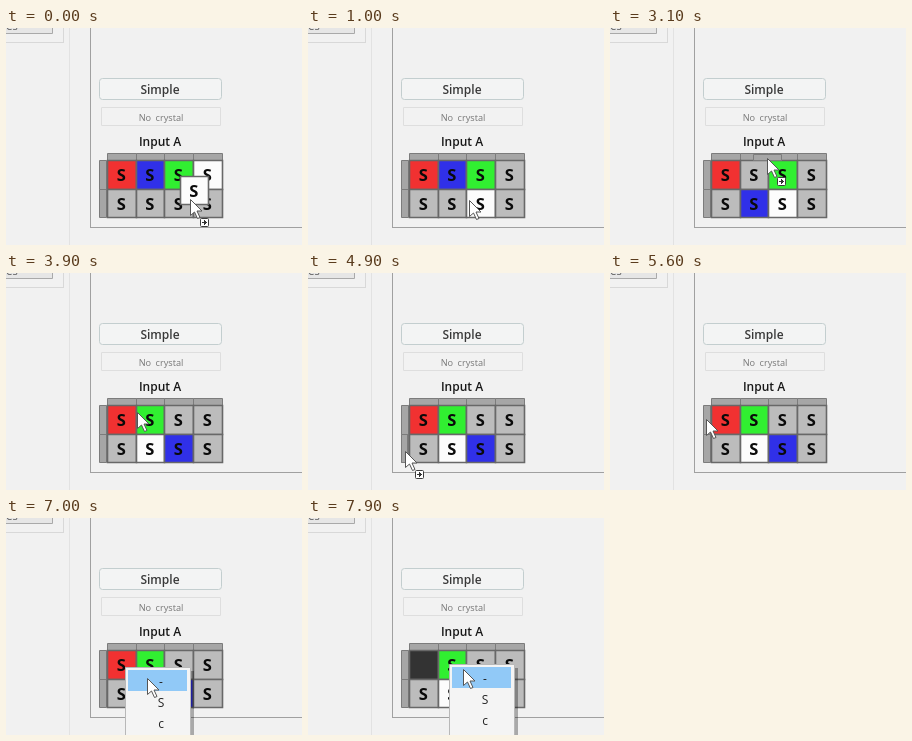
Recreate the animation shown at these times as an HTML page with a canvas. Size 296 px wide and 217 px high, loop 8000 ms.

```html
<!DOCTYPE html>
<html>
<head>
<meta charset="utf-8">
<style>
html, body { margin: 0; height: 100%; overflow: hidden; background: #f1f1f1; }
canvas { display: block; }
</style>
</head>
<body>
<canvas id="stage" width="296" height="217"></canvas>
<script>
const ctx = document.getElementById('stage').getContext('2d');
const LOOP = 8000, STEP = 100;
const GRAY = '#bcbcbc', RED = '#f13131', BLUE = '#3030e8', GREEN = '#31ef31', WHITE = '#fcfcfc', DARK = '#333';
const HEAD = '#a6a6a6';

// Grid geometry: each area is [x, y, width, height]
const colX = c => Math.floor(101.4 + 28.7 * c);
const rowY = r => Math.floor(132.5 + 28.6 * r);
const colHead = c => [colX(c), 125, colX(c + 1) - colX(c), 7];
const rowHead = r => [93, rowY(r), 7, rowY(r + 1) - rowY(r)];
const cellArea = i => {
  const [x, , w] = colHead(i % 4), [, y, , h] = rowHead(i >> 2);
  return [x, y, w, h];
};

// Pointer moves: start, end, destination; it rests in between
const moves = [
  [-200, 0, 184, 171], [0, 300, 172, 182],
  [800, 1200, 149, 161], [1400, 1700, 145, 187],
  [2200, 2700, 172, 129], [3000, 3200, 142, 130],
  [3500, 3900, 131, 139], [3900, 4600, 97, 149],
  [4700, 4900, 97, 178], [5200, 5500, 96, 146],
  [6100, 6500, 119, 149], [6600, 7000, 141, 160],
  [7500, 7700, 141, 146], [7700, 7900, 155, 151]
];

const swapRows = [0, 1, 2, 3].map(i => [i, i + 4]);
const drags = [
  { from: -200, to: 600, cell: 3, area: cellArea(3), swaps: [[3, 6]] },
  { from: 1400, to: 2200, cell: 1, area: cellArea(1), swaps: [[1, 5]] },
  { from: 3000, to: 3500, area: colHead(2), swaps: [[1, 2], [5, 6]] },
  { from: 4700, to: 5000, area: rowHead(0), swaps: swapRows },
  { from: 5200, to: 5500, area: rowHead(1), swaps: swapRows }
];
const menus = [{ from: 6600, to: 7500 }, { from: 7700, to: LOOP }];
const activeAt = (list, t) => list.find(item => t >= item.from && t < item.to);

function pointerAt(t) {
  let x = 197, y = 155;
  for (const [from, to, endX, endY] of moves) {
    const k = Math.max(0, Math.min(1, (t - from) / (to - from)));
    x += (endX - x) * k;
    y += (endY - y) * k;
  }
  return [Math.round(x), Math.round(y)];
}

function cellsAt(t) {
  const cells = [RED, BLUE, GREEN, WHITE, GRAY, GRAY, GRAY, GRAY];
  for (const { to, swaps } of drags) {
    if (t >= to) swaps.forEach(([a, b]) => [cells[a], cells[b]] = [cells[b], cells[a]]);
  }
  if (t >= menus[0].to) cells[0] = DARK;
  return cells;
}

function rect(x, y, w, h, fill) {
  ctx.fillStyle = fill;
  ctx.fillRect(x, y, w, h);
}

function box([x, y, w, h], fill, stroke, radius = 0, line = 1) {
  ctx.beginPath();
  ctx.roundRect(x + .5, y + .5, w, h, radius);
  ctx.fillStyle = fill;
  ctx.fill();
  ctx.strokeStyle = stroke;
  ctx.lineWidth = line;
  ctx.stroke();
}

function text(str, x, y, size, weight, color) {
  ctx.font = `${weight} ${size}px "Open Sans", "Noto Sans", sans-serif`;
  ctx.textAlign = 'center';
  ctx.fillStyle = color;
  ctx.fillText(str, x, y);
}

function drawCell(area, fill) {
  const [x, y, w, h] = area;
  box(area, fill, '#686868', 0, 1.6);
  if (fill !== DARK) text('S', x + w / 2 - .2, y + h / 2 + 6.7, 16.5, 700, '#0a0a0a');
}

const drawHead = area => box(area, HEAD, '#7c7c7c');

function drawWindow() {
  rect(0, 0, 296, 217, '#f1f1f1');
  box([-5, -20, 51, 25], '#e6e6e6', '#a9a9a9');
  text('es', 6, 2, 11, 400, '#555');
  rect(0, 14, 58, 1, '#d8d8d8');
  rect(57, 0, 1, 14, '#d8d8d8');
  rect(63, 0, 1, 217, '#e2e2e2');
  rect(84, 0, 1, 200, '#a0a0a0');
  rect(84, 199, 212, 1, '#a0a0a0');
  box([93, 50, 122, 21], '#f3f4f4', '#c3cecf', 3);
  text('Simple', 154, 66, 12, 600, '#383838');
  box([95, 79, 119, 18], '#f2f2f2', '#dedede');
  ctx.wordSpacing = '2px';
  text('No crystal', 155, 93, 9.2, 400, '#777');
  ctx.wordSpacing = '0px';
  text('Input A', 154, 118, 12, 600, '#181818');
}

function drawGrid(cells) {
  for (let c = 0; c < 4; c++) drawHead(colHead(c));
  for (let r = 0; r < 2; r++) drawHead(rowHead(r));
  cells.forEach((fill, i) => drawCell(cellArea(i), fill));
}

function drawMenu(x, y) {
  rect(x + 4, y + 4, 65, 90, 'rgba(0, 0, 0, .3)');
  box([x, y, 65, 90], '#f4f4f4', '#b8b8b8');
  rect(x + 3, y + 3, 59, 21, '#91c9f7');
  ['-', 'S', 'c'].forEach((item, i) => text(item, x + 36, y + 18.5 + i * 21, 12, 400, '#222'));
}

function drawDrag({ from, area, cell }, x, y, cells) {
  const [grabX, grabY] = pointerAt(from);
  const moved = [area[0] + x - grabX, area[1] + y - grabY, area[2] - 1, area[3] - 1];
  if (cell === undefined) drawHead(moved);
  else drawCell(moved, cells[cell]);
}

function drawPointer(x, y) {
  ctx.save();
  ctx.translate(x + .5, y + .5);
  ctx.beginPath();
  [[0, 0], [0, 16], [4, 12.5], [7, 19], [9.5, 18], [6.5, 11.5], [11.5, 11.5]].forEach(p => ctx.lineTo(...p));
  ctx.closePath();
  ctx.fillStyle = '#fff';
  ctx.fill();
  ctx.strokeStyle = '#555';
  ctx.lineWidth = 1;
  ctx.stroke();
  ctx.restore();
}

function drawDropMark(x, y) {
  box([x, y, 8, 8], '#fff', '#3c3c3c', 1);
  rect(x + 2, y + 4, 5, 1, '#333');
  rect(x + 4, y + 2, 1, 5, '#333');
  rect(x + 5, y + 3, 1, 3, '#333');
}

function draw(now) {
  const t = Math.floor(now % LOOP / STEP) * STEP;
  const [x, y] = pointerAt(t), cells = cellsAt(t);
  const drag = activeAt(drags, t), menu = activeAt(menus, t);
  drawWindow();
  drawGrid(cells);
  if (menu) drawMenu(...pointerAt(menu.from));
  if (drag) drawDrag(drag, x, y, cells);
  drawPointer(x, y);
  if (drag) drawDropMark(x + 10, y + 19);
}

const start = performance.now();
function frame() {
  draw(performance.now() - start);
  requestAnimationFrame(frame);
}
frame();
</script>
</body>
</html>
```
